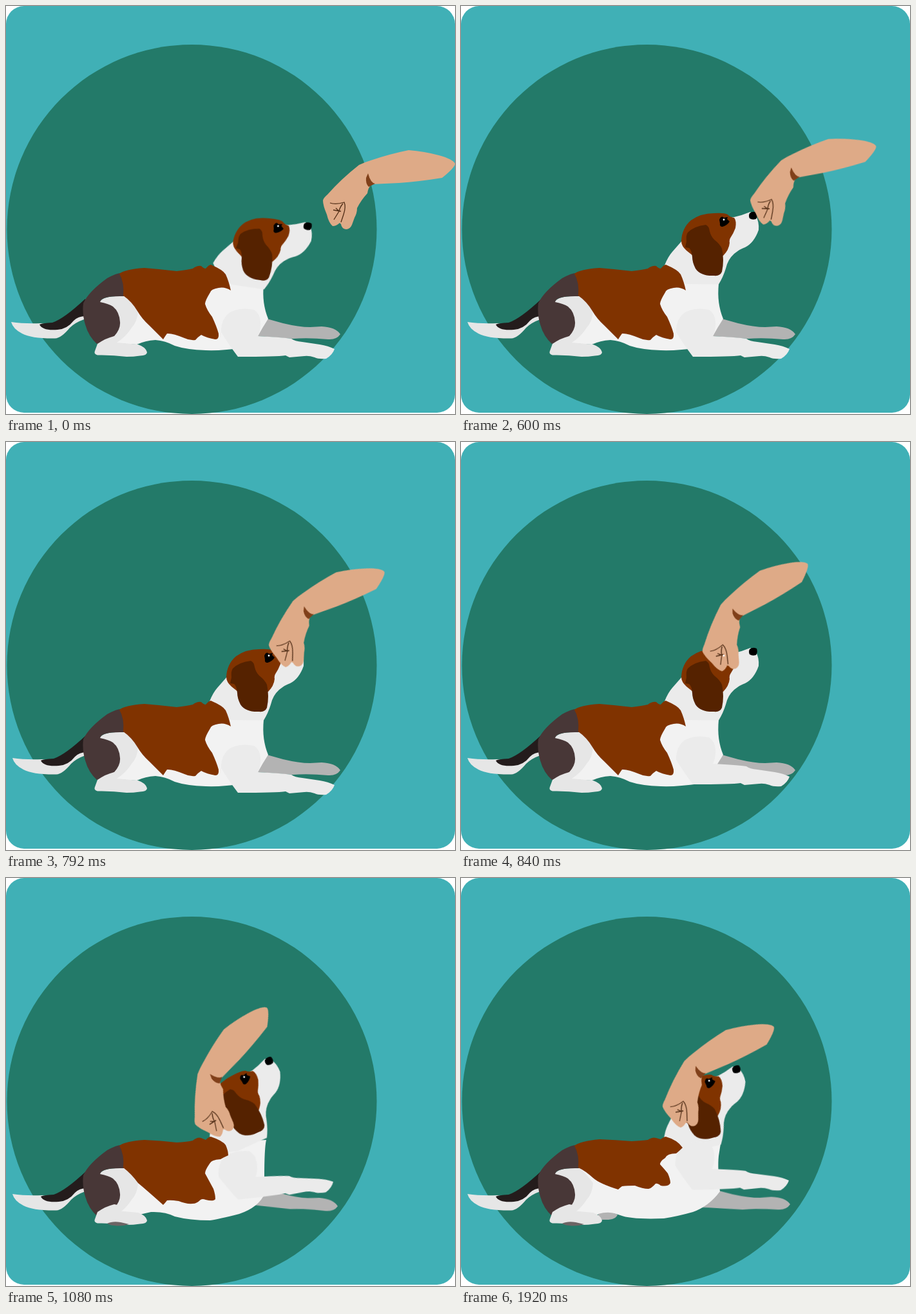
Animation, 697 px wide and 634 px high, one loop 2.4 s. Source, as an HTML page:

```html
<!DOCTYPE html>
<html lang="en">
<head>
<meta charset="utf-8">
<title>Petting a dog</title>
<style>
  html, body { margin: 0; width: 100%; height: 100%; overflow: hidden; background: #fff; }
  svg { display: block; width: 697px; height: 634px; }

  .arm, .head, .leg, .far-leg, .tail, .paw, .body, .saddle, .pad, .far-paw {
    animation: 2.4s step-end infinite;
  }
  .arm { transform-origin: 492px 302px; animation-name: arm; }
  .head { transform-origin: 408px 335px; animation-name: head; }
  .leg { transform-origin: 510px 533px; animation-name: leg; }
  .far-leg { transform-origin: 519px 510px; animation-name: far-leg; }
  .tail { animation-name: tail; }
  .paw { animation-name: paw; }
  .body { animation-name: body; }
  .saddle { animation-name: saddle; }
  .pad { animation-name: pad; }
  .far-paw { animation-name: far-paw; }

  @keyframes arm {
    0% { transform: none; }
    25% { transform: translate(-43px, 0) rotate(-7.8deg); }
    30% { transform: translate(-84px, 14px) rotate(-17deg); }
    35% { transform: translate(-117px, 24px) rotate(-24.4deg); }
    40% { transform: translate(-159px, 48px) rotate(-39.2deg); }
    45% { transform: translate(-198px, 81px) rotate(-43deg); }
    50%, 100% { transform: translate(-179px, 53.5px) rotate(-20.2deg); }
  }
  @keyframes head {
    0% { transform: translate(14px, 10px) rotate(8deg); }
    25% { transform: none; }
    40% { transform: translate(-13px, -13px) rotate(-7deg); }
    45% { transform: translate(-37px, -23px) rotate(-25deg); }
    50%, 100% { transform: translate(-22px, -17px) rotate(-15deg); }
  }
  @keyframes leg {
    0% { transform: none; }
    35% { transform: translate(0, -13px); }
    40% { transform: translate(-2px, -45px) rotate(-6deg); }
    45% { transform: translate(-2px, -61px) rotate(-6deg); }
    50%, 100% { transform: translate(-1px, -63px) rotate(-1deg); }
  }
  @keyframes far-leg {
    0% { transform: none; }
    40% { transform: rotate(-2deg); }
    45% { transform: translate(-4px, 0) rotate(2deg); }
    50%, 100% { transform: translate(-8px, -3px) rotate(-1deg); }
  }
  @keyframes tail {
    0% { transform: translate(-2px, 0); }
    25%, 100% { transform: none; }
  }
  @keyframes paw {
    0% { transform: none; }
    45%, 100% { transform: translate(0, -6px); }
  }
  @keyframes pad {
    0% { visibility: hidden; }
    45%, 100% { visibility: visible; }
  }
  @keyframes far-paw {
    0% { visibility: hidden; }
    50%, 100% { visibility: visible; }
  }
  @keyframes body {
    0% { d: path("M176 440L318 415L345 410L400 432Q397 462 407 486Q398 500 391 513L370 531Q335 536 310 535Q280 534 262 528Q247 520 232 519Q216 520 203 526L170 524Z"); }
    40% { d: path("M176 440L318 415L345 410L402 419Q397 452 405 480L400 505Q388 516 385 518Q365 532 318 536Q280 534 262 528Q247 520 232 519Q216 520 203 526L170 524Z"); }
    45% { d: path("M176 440L318 415L345 410L404 407Q401 420 401 465L402 490Q392 512 362 522Q330 530 317 532Q285 532 262 526Q247 518 225 519L203 524L170 524Z"); }
    50%, 100% { d: path("M176 440L318 415L345 410L405 400L400 432Q398 450 402 487Q385 510 360 519Q335 526 315 529Q265 531 247 524Q235 519 219 522L203 524L170 524Z"); }
  }
  @keyframes saddle {
    0% { d: path("M176 416Q185 409 215 407Q240 409 265 412Q282 410 290 408Q297 403 303 404Q307 408 310 408Q315 402 318 402Q337 410 341 417Q346 428 349 442Q340 436 330 438Q318 440 317 445Q309 458 309 463Q312 473 320 483Q327 498 330 509Q331 518 325 518Q312 516 303 511Q297 515 294 519Q285 520 277 516Q258 508 250 509Q247 513 244 518L222 496Q211 486 204 474Q195 459 182 450Q184 430 176 416Z"); }
    45% { d: path("M176 416Q185 409 215 407Q240 408 265 411Q282 410 290 408Q297 402 303 404L310 407Q315 402 318 402Q336 408 341 415Q345 424 345 431Q338 434 333 437Q318 438 316 444Q309 454 309 459Q316 472 322 483Q325 492 325 499Q322 503 310 500Q305 498 302 500Q296 506 290 506Q280 507 268 502Q255 500 250 501Q247 505 244 508Q216 483 205 474Q195 460 182 450Q184 430 176 416Z"); }
    50%, 100% { d: path("M176 416Q185 409 215 406Q240 407 265 409Q282 408 290 407Q297 402 303 404L310 406Q315 402 318 402Q336 407 344 419Q338 425 334 428Q320 428 317 435Q309 440 309 445Q318 455 321 459Q325 468 325 474Q322 480 310 478Q305 474 302 475Q296 482 291 483Q282 483 270 478Q258 478 250 479Q247 481 244 484Q215 475 205 466Q193 455 182 450Q184 430 176 416Z"); }
  }
</style>
</head>
<body>
<svg viewBox="0 0 697 634">
  <rect width="697" height="632" rx="28" fill="#40b0b6"/>
  <circle cx="288.5" cy="347" r="287" fill="#237a69"/>

  <g class="tail">
    <path fill="#e6e6e6" d="M10 491Q30 494 56 493L85 497L123 478L123 487Q109 492 101 500Q88 516 78 516.500Q42 517 27 509Q13 502 10 491Z"/>
    <path fill="#241c1c" d="M54 495Q57 493 74 492Q92 486 125 455L125 482Q114 482 107 489Q97 502 82 503Q59 505 54 495Z"/>
  </g>

  <path class="far-leg" fill="#b3b3b3" d="M372 492L405 486L430 493Q455 499 472 499L490 498Q512 499 519 510Q513 519 500 518Q470 515 445 517L392 513L372 512Z"/>
  <path class="body" fill="#f2f2f2"/>
  <path class="far-paw" fill="#b3b3b3" d="M213 522Q230 517 243 523Q240 532 222 531L213 531Z"/>

  <!-- Hind leg -->
  <path fill="#e6e6e6" d="M145 461Q148 452 170 451L183 450Q195 460 205 474Q204 490 195 500Q186 514 172 523L150 523Z"/>
  <path fill="#483737" d="M120 462Q128 444 157 423Q173 414 180 415Q184 430 183 451Q148 450 146 460Q160 463 166 467Q176 475 177 491Q178 502 168 513Q155 521 141 525Q128 513 123 495Q118 478 120 462Z"/>
  <path class="paw" fill="#e6e6e6" d="M142 525Q155 516 168 513L178 515L172 523L205 526Q217 530 219 538Q219 543 208 543.500Q198 545 187 545Q165 542 142 542.500Q136 541 138 536Z"/>
  <path class="pad" fill="#6c6464" d="M157 537Q165 533 178 535L191 538Q182 541 172 540.500Q162 540 157 537Z"/>

  <path class="head" fill="#ebebeb" d="M342 366L328 382Q321 390 316 403L330 425L350 432L400 432.500Q407 421 411 408Q414 394 424 385Q434 377 441 375Q455 368 462 348Q463 335 458 327L449 320Q437 325 424 328L380 330Z"/>
  <path class="leg" fill="#ebebeb" d="M334 502Q335 487 345 478Q360 467 385 472Q394 478 395 490Q396 503 391 513Q430 515 443 517Q448 521 460 522L487 526Q500 528 510 533Q507 542 497 548Q485 549 479 546Q470 543 463 544L440 546L434 543Q420 545 360 545Q345 525 334 507Z"/>
  <path class="saddle" fill="#803300"/>

  <g class="head">
    <path fill="#803300" d="M342 365Q343 345 357 333Q372 322 393 322Q408 321 414 324Q417 328 424 329Q428 334 426 345Q423 353 419 359Q416 363 417 368Q416 379 407 388L360 388L350 380Q342 373 342 365Z"/>
    <path fill="#552200" d="M352 352Q362 342 380 340Q385 342 386 350Q388 358 393 363Q402 370 405 377Q409 395 405 413Q402 420 393 419Q372 420 364 408Q359 398 359 390Q358 379 354 376L348 375L350 366Q349 356 352 352Z"/>
    <path d="M401 332Q404 325 408 329L414 328L413 331L417 335Q413 341 406 343Q401 343 402 338Z"/>
    <path d="M448 322Q453 318 459 321Q461 327 458 331Q452 333 448 330Q446 326 448 322Z"/>
  </g>

  <g class="arm">
    <path fill="#deaa87" d="M492 302Q493 298 499 293Q520 269 548 247Q556 243 566 240Q595 230 625 224Q650 226 672 232Q694 238 697 245Q697 251 677 267Q640 273 610 275L567 277Q562 283 561 291Q551 302 545 314Q545 322 541 329L537 340Q534 347 528 347Q521 346 520 339L518 337Q513 342 507 342Q501 337 498 324Q492 310 492 302Z"/>
    <path fill="#80401a" d="M562 260Q566 275 573 276L563 281Q558 276 559 267Z"/>
    <path fill="none" stroke="#502d16" stroke-width="1.3" d="M503 306Q512 309 525 305Q528 312 524 324L520 336M523 307Q518 313 517 319L509 332M508 317L520 319M512 314L517 319"/>
  </g>
  <g class="head"><circle cx="408" cy="332" r="1.400" fill="#fff"/></g>
</svg>
</body>
</html>
```
